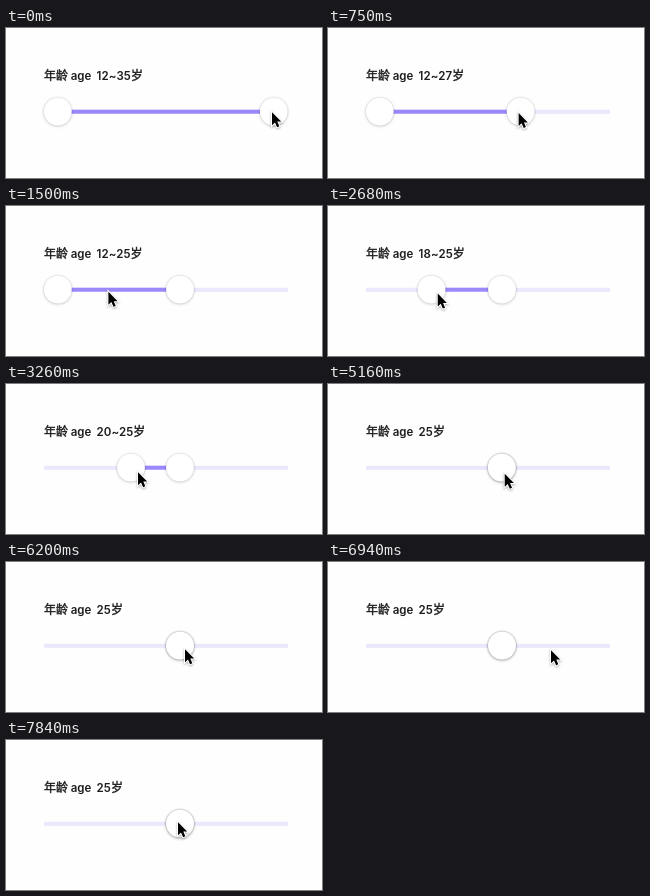
An HTML page for the animation above (8 s loop, 316 by 150 pixels).

```html
<!DOCTYPE html>
<html lang="zh">
<head>
<meta charset="utf-8">
<title>Age range slider</title>
<style>
  html, body { margin: 0; width: 100%; height: 100%; overflow: hidden; background: #fefefe; }
  svg { display: block; width: 316px; height: 150px; }
  text { font: 600 11.5px Inter, sans-serif; letter-spacing: .06px; fill: #1d1d1f; }
  .han { font: 400 12px "Noto Sans CJK SC", "Noto Sans CJK", sans-serif; stroke: #1d1d1f; stroke-width: .4px; }
  .knob { fill: #fff; filter: drop-shadow(0 0 .8px rgba(0, 0, 0, .2)) drop-shadow(0 1px 1.5px rgba(0, 0, 0, .12)); }
  #cursor { filter: drop-shadow(0 1px .8px rgba(0, 0, 0, .3)); }
</style>
</head>
<body>
<svg viewBox="0 0 316 150">
  <text class="han" x="38" y="52">年龄</text>
  <text x="64.7" y="51.5">age</text>
  <text x="90.6" y="51.5"><tspan id="value"></tspan><tspan class="han" dy=".5">岁</tspan></text>
  <rect x="38" y="81.8" width="244" height="4" fill="#ece7fd"/>
  <rect id="range" y="81.7" height="4" fill="#9b88fb"/>
  <circle id="high" class="knob" cy="83.6" r="13.9"/>
  <circle id="low" class="knob" cy="83.6" r="13.9"/>
  <path id="cursor" d="M1 1.2V14.2L4 11.4 6.1 16.2 8.3 15.3 6.3 10.6H10.2Z"
    fill="#000" stroke="#fff" stroke-width="2" paint-order="stroke"/>
</svg>
<script>
const LOOP = 8000, TICK = 147.4, LAST_TICK = 53;
const MIN_AGE = 12, MAX_AGE = 35, MIN_X = 51.8, MAX_X = 267.8, MEET_X = 174;

const linear = p => p;
const smooth = p => p * p * (3 - 2 * p);
const easeOut = p => Math.sin(p * Math.PI / 2);

// A leg moves to a position between two ticks; gaps between legs are rests.
const leg = (from, to, ease, ...end) => ({ from, to, ease, end });

const highLegs = [leg(0, 7, smooth, MEET_X)];
const lowLegs = [leg(14, 22, easeOut, 125), leg(22, 36, easeOut, MEET_X)];
const cursorLegs = [
  leg(0, 7, smooth, 171, 84),
  leg(7, 12, linear, 55, 85),
  leg(14, 22, easeOut, 131, 87),
  leg(22, 36, easeOut, 176, 88.5),
  leg(36, 38, linear, 181, 87.5),
  leg(41, 42, linear, 178, 86),
  leg(43, 47, smooth, 222, 87),
  leg(48, 53, smooth, 171, 81),
];

function follow(start, legs, tick) {
  return legs.reduce((pos, { from, to, ease, end }) => {
    const p = ease(Math.min(1, Math.max(0, (tick - from) / (to - from))));
    return pos.map((v, i) => v + (end[i] - v) * p);
  }, start);
}

const $ = id => document.getElementById(id);
const value = $("value"), range = $("range"), high = $("high"), low = $("low"), cursor = $("cursor");

const ageAt = x => Math.round(MIN_AGE + (x - MIN_X) / (MAX_X - MIN_X) * (MAX_AGE - MIN_AGE));

function draw(time) {
  const tick = Math.min(LAST_TICK, Math.floor(time % LOOP / TICK));
  const [hx] = follow([MAX_X], highLegs, tick);
  const [lx] = follow([MIN_X], lowLegs, tick);
  const [cx, cy] = follow([265, 83], cursorLegs, tick);
  const from = ageAt(lx), to = ageAt(hx);
  value.textContent = from === to ? to : `${from}~${to}`;
  high.setAttribute("cx", hx);
  low.setAttribute("cx", lx);
  range.setAttribute("x", lx);
  range.setAttribute("width", Math.max(0, hx - lx));
  cursor.setAttribute("transform", `translate(${cx} ${cy})`);
}

const start = performance.now();
function frame() {
  draw(performance.now() - start);
  requestAnimationFrame(frame);
}
frame();
</script>
</body>
</html>
```
